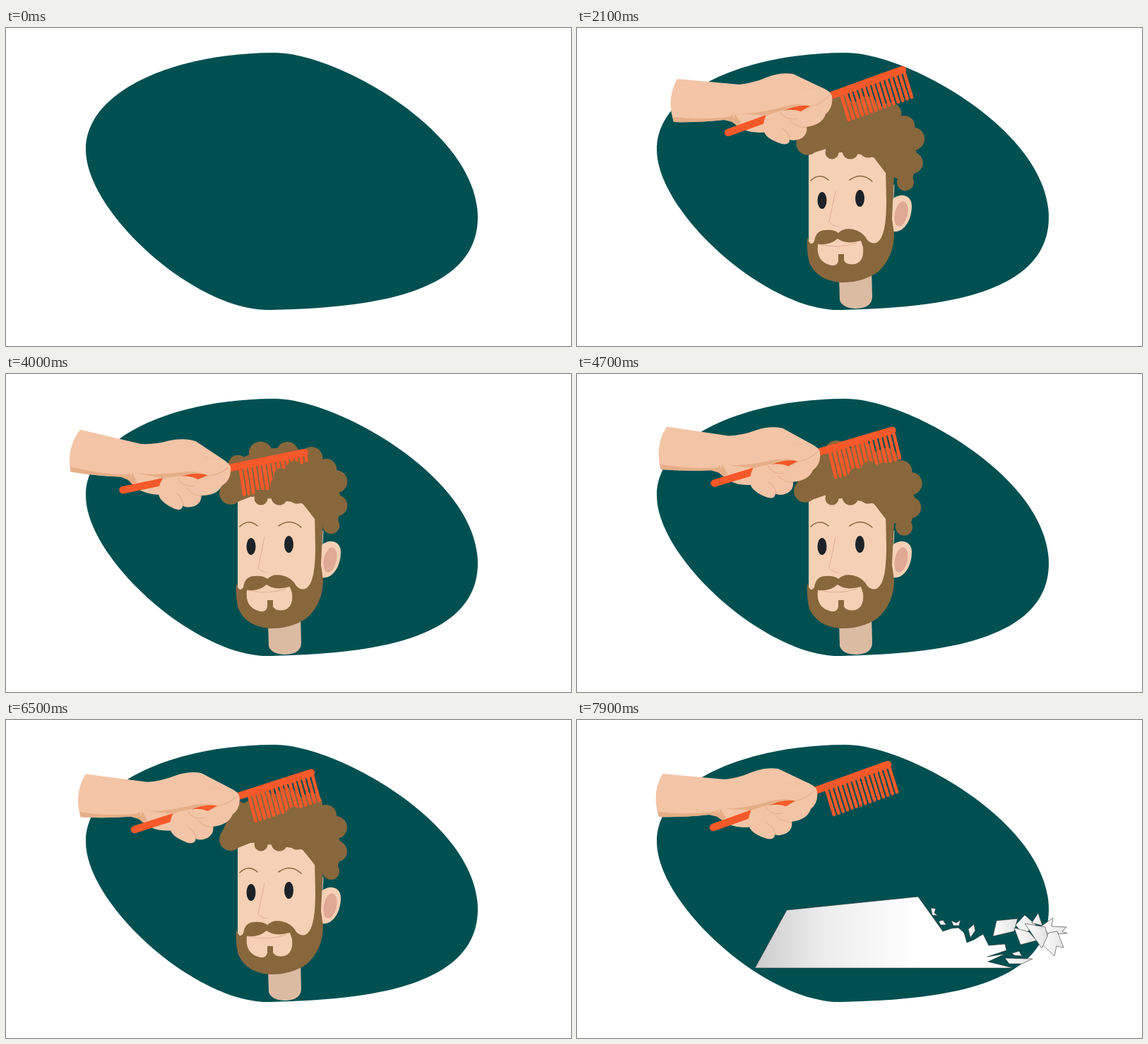
These frames come from a looping animation (800x450 px, 8 s). An HTML page:

```html
<!DOCTYPE html>
<html lang="en">
<head>
<meta charset="utf-8">
<title>Combing</title>
<style>
html, body { margin: 0; width: 100%; height: 100%; overflow: hidden; background: #fff; }
svg { display: block; width: 100vw; height: 100vh; }
.line { fill: none; stroke-linecap: round; stroke-linejoin: round; }
.hair { fill: #88673d; }
.skin { fill: #f6d0b5; }
.hand { fill: #f3c4a6; }
.shade { fill: #e6ae87; }
</style>
</head>
<body>
<svg viewBox="0 0 800 450">
  <defs>
    <linearGradient id="sheet" gradientUnits="userSpaceOnUse" x1="260" y1="0" x2="480" y2="0">
      <stop offset="0" stop-color="#cfcfd0"/><stop offset=".4" stop-color="#ececec"/><stop offset="1" stop-color="#fff"/>
    </linearGradient>
    <linearGradient id="scrap">
      <stop offset="0" stop-color="#fff"/><stop offset="1" stop-color="#e2e2e2"/>
    </linearGradient>
  </defs>

  <path fill="#005052" d="M378 35C464 33 668 145 668 268C668 385 490 396 375 399C268 402 113 260 113 172C113 90 235 36 378 35Z"/>

  <g id="paper" stroke="#333" stroke-width=".6">
    <path fill="url(#sheet)" d="M252 351L297 269L483 250L518 299L530 295L540 294L548 301L552 315L562 311L575 303L583 319L606 317L608 326L581 335L606 331L582 342L618 351Z"/>
    <g fill="url(#scrap)">
      <path d="M501 266L508 267L506 273L511 277L503 276Z"/>
      <path d="M512 285L518 283L523 290L515 290Z"/>
      <path d="M530 284L537 287L543 283L541 291L533 291Z"/>
      <path d="M554 296L562 289L564 298L557 308Z"/>
      <path d="M594 284L624 281L619 299L589 306Z"/>
      <path d="M621 290L634 276L650 290L632 304Z"/>
      <path d="M644 287L653 273L659 291Z"/>
      <path d="M619 294L640 300L651 312L628 318Z"/>
      <path d="M657 292L674 280L672 292L693 293L687 299L694 302L668 303Z"/>
      <path d="M658 317L668 301L680 299L689 322L679 320L676 334Z"/>
      <path d="M634 288L663 293L666 306L658 323Z"/>
      <path d="M606 337L645 338L630 345L612 345Z"/>
      <path d="M616 330L626 327L630 334L619 333Z"/>
    </g>
  </g>

  <g id="head">
    <path fill="#dcbba3" d="M371 350L372 385Q376 397 396 397Q418 396 418 380L417 340Z"/>
    <path class="skin" d="M446 243C455 233 474 234 474 252C474 270 464 291 446 288Z"/>
    <ellipse fill="#dfa995" cx="459" cy="263" rx="9" ry="18" transform="rotate(12 459 263)"/>
    <path class="skin" d="M328 165H440V300L400 350H345L328 305Z"/>
    <path class="line" stroke="#f6d0b5" d="M449 222L447 262"/>
    <path class="hair" d="M437 195L449 205L446 270L449 291Q449 325 425 346Q402 361 373 360Q340 357 329 332Q325 318 326 295Q330 311 336 302Q338 286 352 286Q364 285 370 290Q378 282 391 285Q405 288 411 300Q422 310 430 298Q438 285 438 245Z"/>
    <path class="skin" d="M341 306Q358 308 369 298Q380 307 402 301L405 310Q407 330 394 334Q381 336 378 329V320H370V329Q369 337 360 336Q338 331 341 306Z"/>
    <path class="line" stroke="#dfae95" d="M366 231L357 274Q361 280 370 281M342 306Q370 313 396 304"/>
    <path class="line" stroke="#88673d" stroke-width="1.6" d="M331 216Q343 204 356 215M386 215Q403 203 418 217"/>
    <g fill="#1c2227"><ellipse cx="347" cy="244" rx="6.5" ry="12"/><ellipse cx="400.5" cy="241" rx="6.5" ry="12"/></g>
  </g>
  <g id="backHair" class="hair">
    <path d="M305 160L322 125L360 106L400 104L435 113L462 142L476 180L468 215L442 208L420 184L400 172L346 174L318 185Z"/>
    <circle cx="318" cy="169" r="16"/><circle cx="328" cy="129" r="14"/>
    <circle cx="360" cy="112" r="16.5"/><circle cx="398" cy="112" r="16"/>
    <circle cx="432" cy="119" r="16"/><circle cx="453" cy="135" r="15"/>
    <circle cx="467" cy="152" r="16"/><circle cx="468" cy="186" r="15"/>
    <circle cx="460" cy="214" r="12"/>
  </g>

  <g class="pose">
    <path class="hand" d="M222 115L272 112L270 147Q240 151 226 137Z"/>
    <path class="shade" d="M208 124L224 122L232 134L226 138Z"/>
    <g class="line" stroke="#f8592a">
      <path stroke-width="10.5" d="M214 148L461 59"/>
      <path id="teeth" stroke-width="4.6"/>
    </g>
  </g>

  <g id="frontHair" class="hair">
    <path d="M375 152L390 136L425 128L450 135L460 180L450 206L425 184L372 176Z"/>
    <circle cx="389" cy="143" r="10"/><circle cx="408" cy="135" r="12"/><circle cx="428" cy="138" r="14"/>
  </g>
  <g id="fringe" class="hair">
    <path d="M352 164H430L449 180V212L437 205L420 183L402 174L375 176L352 178Z"/>
    <circle cx="361" cy="176" r="9.5"/><circle cx="387" cy="174" r="11.5"/><circle cx="412" cy="172" r="11.5"/>
  </g>

  <g class="pose">
    <path class="hand" d="M142 72L230 80Q250 78 268 70Q288 62 306 65L346 84Q361 90 361 98Q363 113 352 122Q347 137 325 140Q327 150 318 156Q308 161 301 158Q301 166 290 164Q268 157 265 147Q262 135 268 123L224 119L222 132L208 130Q170 134 137 133Q126 100 142 72Z"/>
    <path class="shade" d="M135 124Q175 130 220 121L224 134L208 130Q170 134 137 133Z"/>
    <path class="hand" d="M134 120Q180 127 224 117L218 125Q185 131 136 126Z"/>
    <path class="shade" d="M298 80Q318 88 342 86Q322 89 298 80ZM228 121Q255 122 290 112Q315 105 332 111L318 118Q300 111 268 124Z"/>
    <path fill="#f8592a" d="M293 117Q312 108 330 110L317 118Q305 114 293 117Z"/>
    <path class="line" stroke="#e6ae87" d="M288 119Q296 132 312 128M302 158Q299 146 290 142M325 141Q310 140 303 132M357 96Q345 108 330 111"/>
  </g>
</svg>
<script>
const LOOP = 8000, STEP = 100, STROKE = 1150, TEETH = 15;
const el = id => document.getElementById(id);
const move = (node, value) => node.setAttribute('transform', value);

el('teeth').setAttribute('d', Array.from({ length: TEETH }, (_, i) => {
  const u = i / (TEETH - 1);
  return `M${374 + u * 89} ${94 - u * 32}l11 36`;
}).join(''));

// Linear interpolation through [time, ...values] keys.
function track(keys, t) {
  const i = Math.max(1, keys.findIndex(k => k[0] >= t));
  const a = keys[i - 1], b = keys[i];
  const u = Math.min(1, Math.max(0, (t - a[0]) / (b[0] - a[0])));
  return a.slice(1).map((v, j) => v + (b[j + 1] - v) * u);
}

// Values: x, y, tilt of the hand, and how far the hair is combed over.
const rest = [3, -2, -.5, 0], lifted = [-32, 7, 2, 1];
const strokeKeys = [
  [0, ...rest], [.087, 0, 0, 0, .1], [.74, -48.5, 16, 8.2, .97],
  [.783, -47, 15, 8, 1], [.913, ...lifted], [.957, -5, 1.5, .9, 1], [1, ...rest]
];
const endKeys = [
  [6500, ...lifted], [6700, -20, 2, .3, .4], [6900, -12, 0, -.3, 0],
  [7200, -12, 0, -.3, 0], [7900, -21, 4, 0, 0]
];

function pose(t) {
  if (t < 2000) return rest;
  return t < 6500 ? track(strokeKeys, (t - 2000) / STROKE % 1) : track(endKeys, t);
}

function draw(now) {
  const t = Math.floor(now % LOOP / STEP) * STEP;
  const [x, y, tilt, combed] = pose(t);
  const enter = Math.min(0, (t - 1300) * .52);
  const rise = Math.max(0, (1200 - t) * .4);
  const swap = Math.max(0, (t - 7200) / 700);

  document.querySelectorAll('.pose').forEach(g =>
    move(g, `translate(${x + enter} ${y}) rotate(${tilt} 213 148)`));

  const slide = `translate(${-500 * swap} ${rise})`;
  const twist = `${slide} rotate(${4.3 * (1 - combed)} 400 290)`;
  move(el('head'), slide);
  move(el('fringe'), slide);
  move(el('backHair'), twist);
  move(el('frontHair'), twist);
  move(el('paper'), `translate(${560 * (1 - swap)} 0)`);
  requestAnimationFrame(draw);
}
requestAnimationFrame(draw);
</script>
</body>
</html>
```
